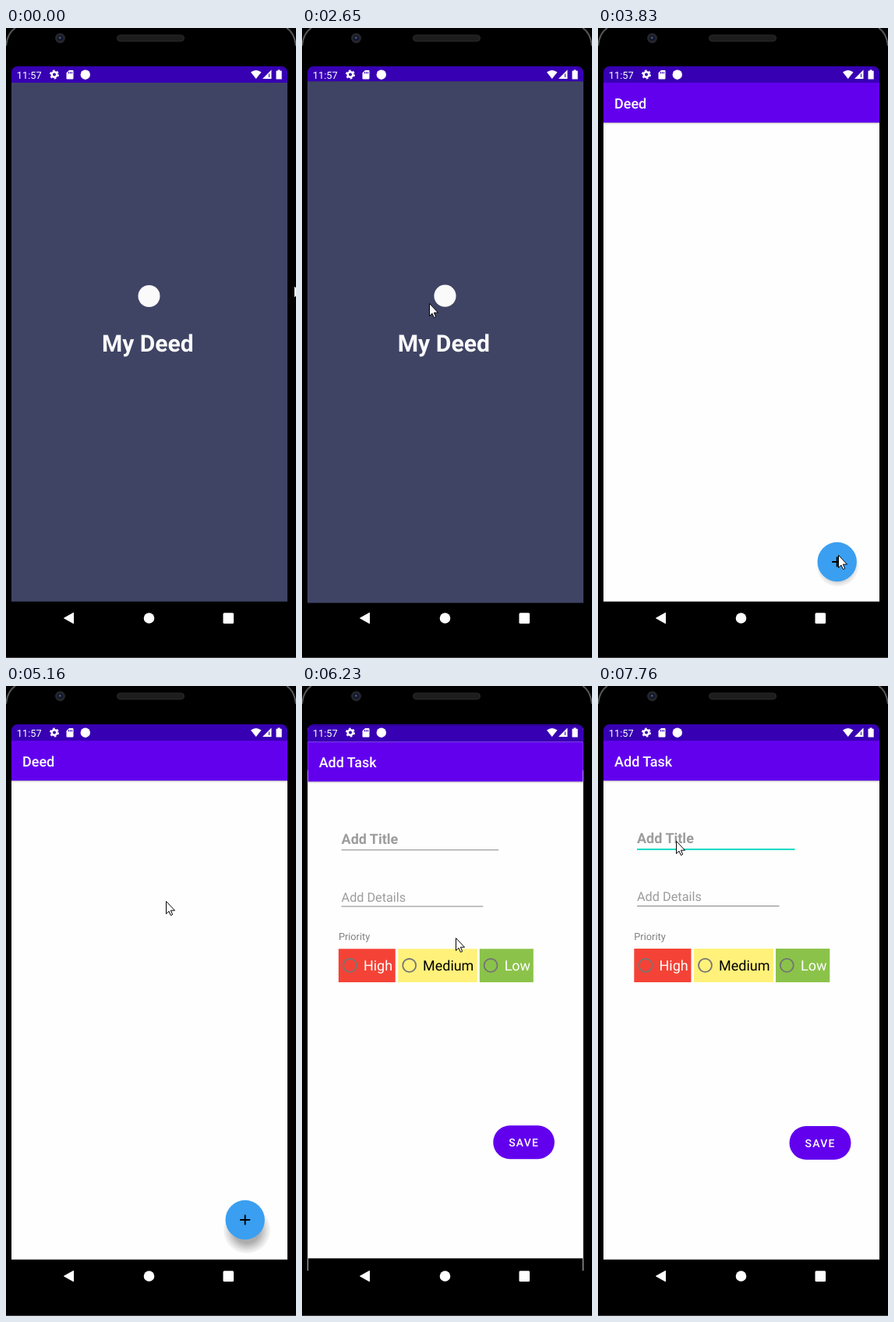
Write an HTML page that moves like this. It is 372 by 806 pixels and loops after 8000 ms.

```html
<!DOCTYPE html>
<html lang="en">
<head>
<meta charset="utf-8">
<title>Task app demo</title>
<style>
html, body { margin: 0; width: 100%; height: 100%; overflow: hidden; background: #000; }
svg { display: block; width: 100vw; height: 100vh; }
text { font-family: Roboto, sans-serif; fill: #fff; text-rendering: geometricPrecision; }
.bar { font-size: 18px; font-weight: 500; }
.hint { fill: #9c9c9c; }
.opt { font-size: 18px; }
</style>
</head>
<body>
<svg viewBox="0 0 372 806">
  <defs>
    <clipPath id="screen"><path d="M7 748V57a8 8 0 0 1 8-8H353a8 8 0 0 1 8 8V748z"/></clipPath>
    <radialGradient id="shade">
      <stop offset=".55" stop-opacity=".32"/>
      <stop offset=".88" stop-opacity=".09"/>
      <stop offset="1" stop-opacity=".03"/>
    </radialGradient>
    <linearGradient id="drop" x2="0" y2="1">
      <stop stop-opacity=".25"/><stop offset="1" stop-opacity="0"/>
    </linearGradient>
    <g id="window">
      <path d="M7 49h354v757H7z"/>
      <path fill="#3700b3" d="M7 49h354v21.500H7z"/>
    </g>
    <g id="page">
      <use href="#window"/>
      <path fill="#fefefe" d="M7 70h354v663.700H7z"/>
      <path fill="#6200ee" d="M7 70h354v51H7z"/>
      <path fill="url(#drop)" d="M7 121h354v2.500H7z"/>
    </g>
  </defs>

  <!-- phone body -->
  <path d="M0 0h372v806H0z"/>
  <path d="M0 23Q2 6 12 0M360 0Q370 6 372 23" fill="none" stroke="#55575b" stroke-width="2"/>
  <path d="M0 805.500H372" stroke="#3a3a3a"/>
  <circle cx="69.500" cy="13" r="6.500" fill="#24262b"/>
  <circle cx="69.500" cy="13" r="3.600" fill="#14182c"/>
  <circle cx="69.300" cy="12.500" r="1.200" fill="#56628c"/>
  <rect x="142.500" y="9" width="86" height="8" rx="4" fill="#1d1d1d" stroke="#2a2a2a"/>

  <g clip-path="url(#screen)">
    <g id="splash">
      <use href="#window"/>
      <path fill="#3f4465" d="M7 70h354v663.700H7z"/>
      <circle cx="183.500" cy="343" r="14" fill="#fafafa"/>
      <text x="123" y="414" font-size="30" font-weight="700" style="fill:#fafafa">My Deed</text>
    </g>

    <g id="main">
      <use href="#page"/>
      <text class="bar" x="21" y="103">Deed</text>
      <circle id="shadow" fill="url(#shade)"/>
      <circle cx="306.700" cy="683" r="25.200" fill="#3a9ff1"/>
      <circle id="ripple" cx="306.700" cy="683" r="25.200" fill="#fff"/>
      <path d="M300.200 683h13M306.700 676.500v13" stroke="#000" stroke-width="1.900"/>
    </g>

    <g id="task">
      <use href="#page"/>
      <text class="bar" x="21" y="103">Add Task</text>
      <text class="hint" x="50" y="201" font-size="18" font-weight="700">Add Title</text>
      <path id="line" d="M50 209H252.500"/>
      <path id="caret" d="M50.500 182V207" stroke="#03dac5" stroke-width="2"/>
      <text class="hint" x="50" y="275" font-size="16.300">Add Details</text>
      <path d="M50 281.500H232.500" stroke="#858585"/>
      <text x="46.300" y="325" font-size="12.800" style="fill:#808080">Priority</text>
      <path fill="#f44336" d="M46.300 336h73.200v43H46.300z"/>
      <path fill="#fff17a" d="M123 336h102v43H123z"/>
      <path fill="#8bc34a" d="M228 336h69.300v43H228z"/>
      <g fill="none" stroke="#757575" stroke-width="1.800">
        <circle cx="61" cy="357.300" r="8.500"/>
        <circle cx="137.500" cy="357.300" r="8.500"/>
        <circle cx="242.300" cy="357.300" r="8.500"/>
      </g>
      <text class="opt" x="78.500" y="364">High</text>
      <text class="opt" x="155" y="364" style="fill:#000">Medium</text>
      <text class="opt" x="260" y="364">Low</text>
      <rect x="245.500" y="563" width="79" height="43" rx="21.500" fill="#6200ee"/>
      <text x="265.500" y="590" font-size="14" font-weight="500" letter-spacing="1.250">SAVE</text>
    </g>
  </g>

  <!-- status and navigation icons -->
  <g fill="#fff">
    <text x="13.800" y="64.500" font-size="12.800">11:57</text>
    <circle cx="62" cy="59.500" r="3.300" fill="none" stroke="#fff" stroke-width="2.600"/>
    <circle cx="62" cy="59.500" r="5.100" fill="none" stroke="#fff" stroke-width="1.800" stroke-dasharray="2.700 2.640"/>
    <path d="M81 54h4.500q1 0 1 1v9.500q0 1-1 1h-7q-1 0-1-1v-7z"/>
    <path d="M80.500 56v2.500M82.500 56v2.500M84.500 56v2.500" stroke="#3700b3"/>
    <circle cx="101.800" cy="59.700" r="6.200"/>
    <path d="M314 56.500Q320.700 51.500 327.500 56.500L320.700 65z"/>
    <path d="M340.500 53.500V65H329z"/>
    <path d="M337.500 58.500v4.500" stroke="#3700b3"/>
    <path d="M348.500 53.500h3v1.200h2.200V65.500h-7.200V54.700h2z"/>
    <path d="M74.500 755L86.500 748.300V761.700z" stroke="#fff" stroke-linejoin="round"/>
    <circle cx="183.500" cy="755" r="6.800"/>
    <rect x="278.500" y="748.300" width="13.600" height="13.600" rx="1.500"/>
  </g>

  <path id="pointer" d="M.5.5V16.500L4 13.200 6.400 18.500 8.700 17.500 6.400 12.200H11.500z" fill="#fff" stroke="#000"/>
</svg>
<script>
const $ = id => document.getElementById(id);
const LOOP = 8000, TEAL = '#03dac5', FRAME = 120, PAGE_FRAME = 135;

// Pointer strokes: start time, number of jumps, end point.
const strokes = [
  [140, 3, 258, 578], [530, 2, 220, 297], [790, 3, 225, 557], [1160, 3, 163, 352],
  [3320, 3, 290, 648], [3710, 2, 308, 674], [4770, 2, 298, 647], [5030, 2, 205, 275],
  [6080, 2, 197, 322], [6350, 4, 100, 198]
];

const clamp = v => Math.min(1, Math.max(0, v));
const smooth = u => u * u * (3 - 2 * u);
const frames = (t, start, gap = FRAME) => Math.floor((t - start) / gap);
const steps = (t, start, n) => clamp((frames(t, start) + 1) / n);

const opening = (t, start, phase, pace) =>
  t < start ? 0 : smooth(clamp(phase + pace * frames(t, start, PAGE_FRAME)));
const enter = p => .85 + .15 * p;
const leave = p => 1 + .05 * p;
const fade = p => clamp((p - .43) / .43);

const set = (id, attrs) => {
  for (const k in attrs) $(id).setAttribute(k, attrs[k]);
};
const place = (id, scale, opacity) => set(id, {
  transform: `translate(184 398.5) scale(${scale}) translate(-184 -398.5)`, opacity
});

function pointerAt(t) {
  let x = 369, y = 329;
  for (const [start, n, toX, toY] of strokes) {
    const u = steps(t, start, n);
    x += (toX - x) * u;
    y += (toY - y) * u;
  }
  return [x, y];
}

function draw(t) {
  const p = opening(t, 2650, .21, .55), q = opening(t, 6080, .55, .35);
  place('splash', leave(p), p < 1 ? 1 : 0);
  place('main', enter(p) * leave(q), q < 1 ? fade(p) : 0);
  place('task', enter(q), fade(q));

  const lift = steps(t, 4360, 3);
  set('shadow', { cx: 307.5 + 1.5 * lift, cy: 687.5 + 8.5 * lift, r: 27 + 3 * lift });
  set('ripple', { opacity: .25 * (lift - steps(t, 4770, 2)) });

  const focused = t >= 7120;
  set('line', { stroke: focused ? TEAL : '#858585', 'stroke-width': focused ? 1.8 : 1 });
  set('caret', { opacity: t >= 7370 && t < 7760 ? 1 : 0 });
  set('pointer', { transform: `translate(${pointerAt(t)})` });
}

const start = performance.now();
(function tick() {
  draw((performance.now() - start) % LOOP);
  requestAnimationFrame(tick);
})();
</script>
</body>
</html>
```
